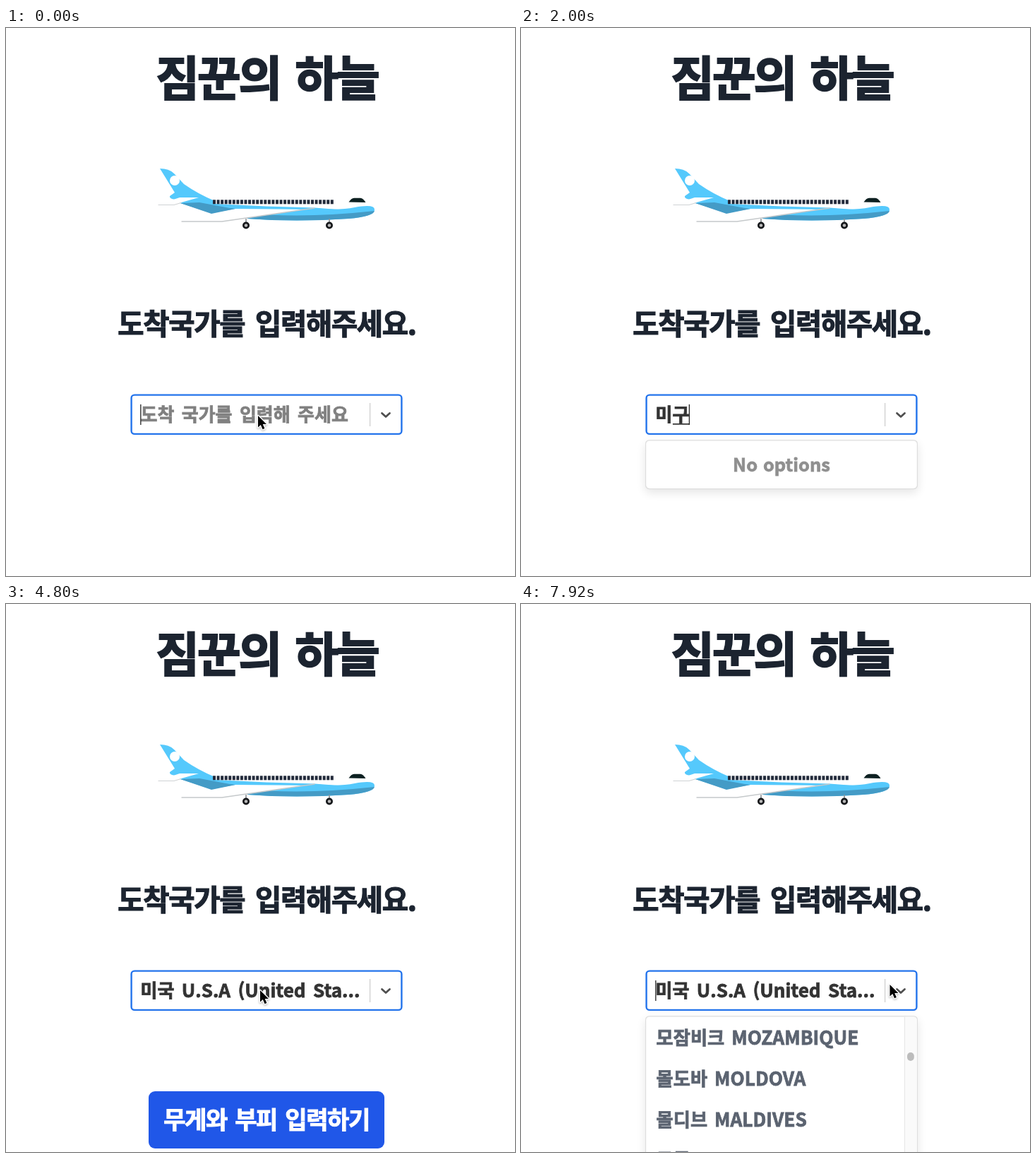
Recreate the animation shown at these times as an HTML page with a canvas. Size 721 by 776 pixels, loop 8000 ms.

```html
<!DOCTYPE html>
<html lang="ko">
<head>
<meta charset="utf-8">
<title>도착국가 입력</title>
<style>
  html, body { margin: 0; width: 100%; height: 100%; overflow: hidden; background: #fff; }
  canvas { display: block; width: 721px; height: 776px; }
</style>
</head>
<body>
<canvas id="stage"></canvas>
<script>
const W = 721, H = 776, LOOP = 8000, STEP = 80;
const FONT = '"Noto Sans CJK KR", "Noto Sans CJK", "Noto Sans CJK JP", sans-serif';
const INK = '#1c2430', OPTION = '#5b6370', SKY = '#55c9fc', DEEP = '#449bc6';
const ROW = 57.6, LINE = 38.4, PAD = 9.6;

const canvas = document.getElementById('stage');
const ctx = canvas.getContext('2d');
const dpr = window.devicePixelRatio || 1;
canvas.width = W * dpr;
canvas.height = H * dpr;

const USA = ['미국 U.S.A (United States', 'of America)'];
const LISTS = {
  all: { rows: [['가나 GHANA'], ['가봉 GABON'], ['가이아나 GUYANA'], ['감비아 GAMBIA']],
         top: 589, focus: 0, thumb: [589, 12] },
  mi: { rows: [['도미니카공화국 DOMINICAN', 'REPUBLIC'], USA], top: 589, focus: 0, thumb: [588, 158] },
  usa: { rows: [USA], top: 589, focus: 0, bottom: 690 },
  picked: { rows: [['모잠비크 MOZAMBIQUE'], ['몰도바 MOLDOVA'], ['몰디브 MALDIVES'], ['몽골 MONGOLIA']],
            top: 585.7, focus: -1, thumb: [635, 12] },
  none: { bottom: 653 }
};

// [start, menu, typed text, composing character]
const STATES = [
  [0, null, ''], [80, 'all', ''],
  [1040, 'none', 'ㅁ', 0], [1200, 'mi', '미', 0], [1440, 'mi', '미ㄱ', 1],
  [1840, 'none', '미구', 1], [2080, 'usa', '미국', 1],
  [3040, null, null], [4960, 'picked', null], [6160, null, null], [7440, 'picked', null]
];
const CARET = [[0, 640], [1040, 2640], [4960, 5480], [6000, 6160], [7440, 8000]];

// Each path is a list of [time, x, y]; the pointer hides between paths.
const PATHS = [
  [[0, 357, 549], [1040, 357, 549]],
  [[4000, 395, 750], [4240, 380, 630], [4480, 364, 482], [4640, 361, 545],
   [4800, 360, 547], [5520, 356, 543], [5840, 356, 543]],
  [[6800, 372, 600], [7200, 400, 560], [7600, 420, 541], [7920, 522.5, 539], [8000, 522.5, 539]]
];

// The thin stroke thickens the letters to a display weight.
function text(str, x, cy, size, color, { weight = 700, align = 'left', gap = 0, track = 0 } = {}) {
  ctx.font = `${weight} ${size}px ${FONT}`;
  ctx.textAlign = align;
  ctx.wordSpacing = gap + 'px';
  ctx.letterSpacing = track + 'px';
  ctx.fillStyle = ctx.strokeStyle = color;
  ctx.lineWidth = size * 0.03;
  ctx.lineJoin = 'miter';
  ctx.miterLimit = 3;
  ctx.fillText(str, x, cy + size * 0.375);
  ctx.strokeText(str, x, cy + size * 0.375);
}

function rounded(x, y, w, h, r) {
  ctx.beginPath();
  ctx.roundRect(x, y, w, h, r);
}

function shape(d, fill, stroke, width = 1) {
  const p = new Path2D(d);
  if (fill) { ctx.fillStyle = fill; ctx.fill(p); }
  if (stroke) { ctx.strokeStyle = stroke; ctx.lineWidth = width; ctx.stroke(p); }
}

function disc(x, y, r, color) {
  ctx.fillStyle = color;
  ctx.beginPath();
  ctx.arc(x, y, r, 0, Math.PI * 2);
  ctx.fill();
}

function drawPlane() {
  // Fin, tail and the stripe below the windows
  shape('M218 199 Q231 199 238 206 L252 221 Q272 235 296 245 V249 Q370 253 437 254.5 L470 257 L437 257 L325 256 L291 262 L247 248 L240 243 Q231 242 232 238 L239 233 Z', SKY);
  shape('M247 248 L274 247 L317 255 L325 256 L291 263 Z', DEEP);
  shape('M216 250 L238 250 L273 240 L246 240 Z', '#fff');
  shape('M216 250.5 H238 L248 247.5', null, '#cfd2d4', 1.2);
  disc(239, 216, 7, '#fff');

  // Nose and belly
  shape('M342 269 L437 255 Q470 259 494 254 Q522 249 522 257 Q523 267 485 270 Q410 275 342 270 Z', SKY);
  shape('M342 269.5 L372 264.5 Q440 268 522 259 Q520 267 485 270 Q410 275 342 270 Z', DEEP);
  shape('M249 274 H306 L437 255', null, '#c5c9cb', 1.3);

  ctx.fillStyle = '#232b3b';
  for (let i = 0; i < 31; i++) ctx.fillRect(293 + i * 5.56, 243.3, 4, 6);
  shape('M485.5 246.5 Q489 241 493 240.7 H502 Q506 241 509.5 247 Z', '#0d2021');
  for (const x of [340, 458]) {
    shape(`M${x} 271 V276`, null, '#92989c', 1.8);
    disc(x, 279.5, 5, '#15171a');
    disc(x, 279.5, 2.3, '#b9b9b9');
  }
}

function drawButton(alpha) {
  if (alpha <= 0) return;
  ctx.save();
  ctx.globalAlpha = alpha;
  rounded(202, 690, 334, 81, 9);
  ctx.fillStyle = '#2057e8';
  ctx.fill();
  text('무게와 부피 입력하기', 369, 730.5, 34, '#fff', { weight: 900, align: 'center', gap: 5, track: -1.4 });
  ctx.restore();
}

function drawControl(typed, composing, caretOn) {
  rounded(177.6, 519.6, 382.8, 55.3, 4.5);
  ctx.fillStyle = '#fff';
  ctx.fill();
  ctx.strokeStyle = '#2474ec';
  ctx.lineWidth = 2.4;
  ctx.stroke();

  ctx.fillStyle = '#ccc';
  ctx.fillRect(515, 531, 1.2, 33);
  ctx.lineCap = ctx.lineJoin = 'round';
  shape('M532.5 545.5 L538 550.5 L543.5 545.5', null, '#4f4f4f', 2.8);

  const size = 26, gap = 4.5;
  let caretX = 190.8;
  if (typed === null) {
    text('미국 U.S.A (United Sta...', 190.5, 547.5, size, '#333', { gap });
  } else if (typed === '') {
    text('도착 국가를 입력해 주세요', 190.5, 547.5, size, '#808080', { gap });
  } else {
    text(typed, 190.5, 547.5, size, '#333');
    const from = 191 + ctx.measureText(typed.slice(0, composing)).width;
    caretX = 190.5 + ctx.measureText(typed).width;
    ctx.fillStyle = '#333';
    ctx.fillRect(from, 560, caretX - from, 1.7);
  }
  if (caretOn) {
    ctx.fillStyle = '#222';
    ctx.fillRect(caretX - 0.6, 533, 1.3, 29);
  }
}

function drawMenu(name) {
  const { rows, top, focus, thumb, bottom = 944 } = LISTS[name];
  const x = 177.2, y = 584.4, w = 383.6, h = bottom - y - 1;
  ctx.save();
  ctx.shadowColor = 'rgba(0,0,0,.1)';
  ctx.shadowBlur = 13 * dpr;
  ctx.shadowOffsetY = 5 * dpr;
  rounded(x - 1.2, y - 1.2, w + 2.4, h + 2.4, 5.5);
  ctx.fillStyle = '#dedede';
  ctx.fill();
  ctx.restore();
  rounded(x, y, w, h, 4.8);
  ctx.fillStyle = '#fff';
  ctx.fill();

  if (!rows) {
    text('No options', 369, 618, 25.5, '#8f8f8f', { align: 'center', gap: 2 });
    return;
  }
  ctx.save();
  ctx.clip();
  const right = thumb ? 543 : 561;
  let rowY = top;
  rows.forEach((lines, i) => {
    const height = ROW + (lines.length - 1) * LINE;
    if (i === focus) {
      ctx.fillStyle = '#d6e5ff';
      ctx.fillRect(x, rowY, right - x, height);
    }
    lines.forEach((line, n) =>
      text(line, 191.5, rowY + PAD + LINE * (n + 0.5), 26.3, OPTION, { gap: 4 }));
    rowY += height;
  });
  if (thumb) {
    ctx.fillStyle = '#fafafa';
    ctx.fillRect(543, y, 18, h);
    ctx.fillStyle = '#e6e6e6';
    ctx.fillRect(543, y, 1, h);
    rounded(547, thumb[0], 9.8, thumb[1], 4.9);
    ctx.fillStyle = '#bcbcbc';
    ctx.fill();
  }
  ctx.restore();
}

function drawPointer(t) {
  const path = PATHS.find(p => t >= p[0][0] && t < p[p.length - 1][0]);
  if (!path) return;
  const i = path.findIndex(k => t < k[0]);
  const [t0, x0, y0] = path[i - 1], [t1, x1, y1] = path[i];
  const u = (t - t0) / (t1 - t0), k = u * u * (3 - 2 * u);
  ctx.save();
  ctx.translate(x0 + (x1 - x0) * k, y0 + (y1 - y0) * k);
  ctx.lineJoin = 'round';
  ctx.shadowColor = 'rgba(0,0,0,.3)';
  ctx.shadowBlur = 3 * dpr;
  ctx.shadowOffsetY = 1.2 * dpr;
  const arrow = 'M0 0 V16.5 L3.8 12.9 L6.5 19.2 L9.4 18 L6.7 11.9 H12 Z';
  shape(arrow, null, '#fff', 2.6);
  ctx.shadowColor = 'transparent';
  shape(arrow, '#000');
  ctx.restore();
}

function draw(t) {
  ctx.setTransform(dpr, 0, 0, dpr, 0, 0);
  ctx.fillStyle = '#fff';
  ctx.fillRect(0, 0, W, H);

  text('짐꾼의 하늘', 369.5, 71, 67, INK, { weight: 900, align: 'center', gap: 9, track: -3 });
  drawPlane();
  text('도착국가를 입력해주세요.', 369.5, 419, 40.5, INK, { weight: 900, align: 'center', gap: 7, track: -1.3 });

  const [, menu, typed, composing] = STATES.findLast(s => t >= s[0]);
  const caretOn = CARET.some(([a, b]) => t >= a && t < b);
  if (t >= 3040) drawButton(Math.min(1, 0.04 + (t - 3040) / 250));
  drawControl(typed, composing, caretOn);
  if (menu) drawMenu(menu);
  drawPointer(t);
}

const start = performance.now();
function frame() {
  const t = (performance.now() - start) % LOOP;
  draw(Math.floor(t / STEP) * STEP);
  requestAnimationFrame(frame);
}
frame();
</script>
</body>
</html>
```
